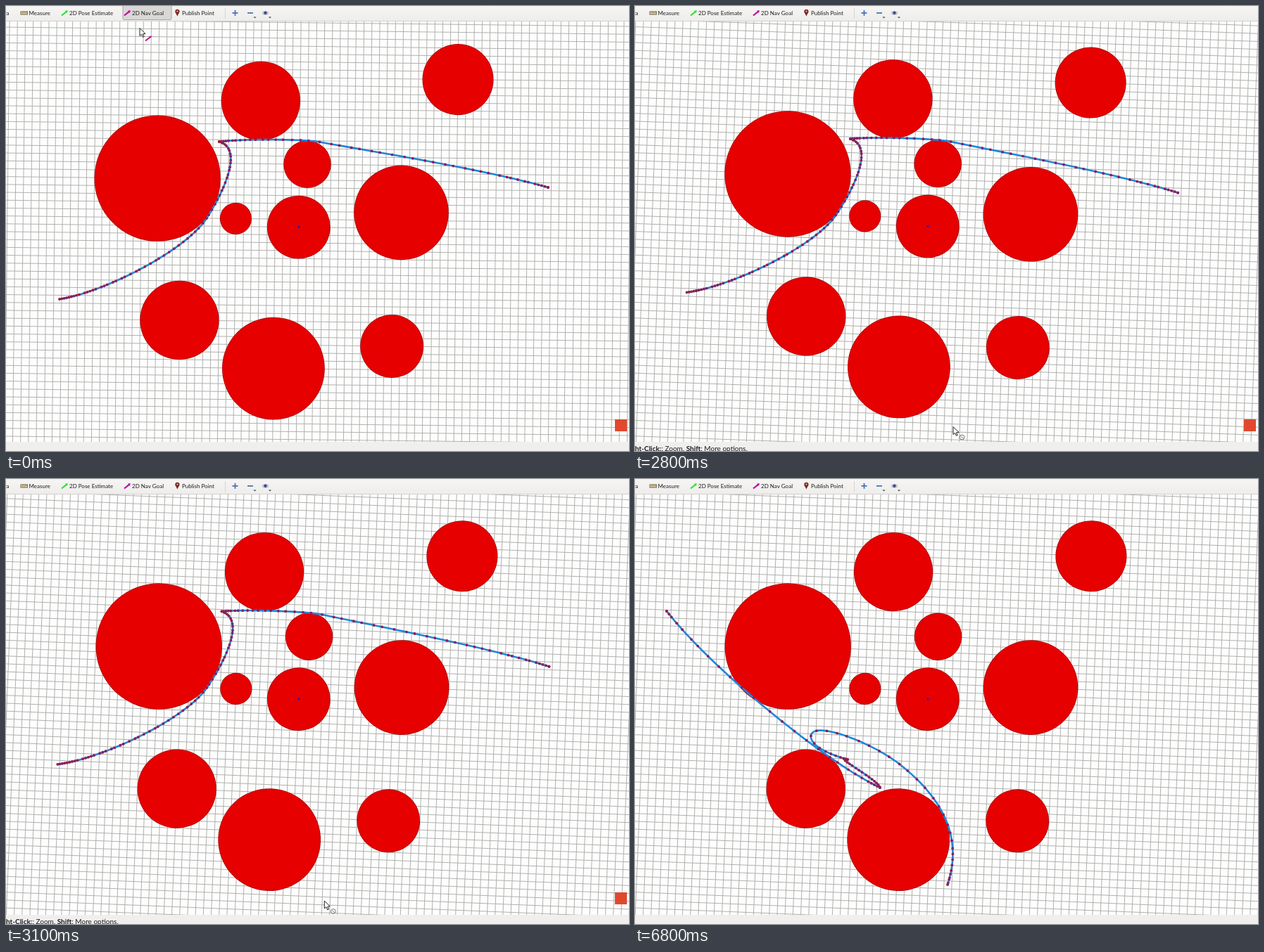
Write an HTML page with a canvas that moves like this. It is 885 by 633 pixels and loops after 6.9 s.

```html
<!DOCTYPE html>
<html lang="en">
<head>
<meta charset="utf-8">
<title>Path planner view</title>
<style>
html, body { margin: 0; width: 100%; height: 100%; overflow: hidden; background: #f1f0ef; }
canvas { display: block; }
</style>
</head>
<body>
<canvas id="view" width="885" height="633"></canvas>
<script>
const ctx = document.getElementById('view').getContext('2d');
const LOOP = 6900, STEP = 100;
const CELL = 11.19, CX = 415.8, CY = 314.6;
const YAW = 0.0115, YAW_PER_PX = 0.0124, DRAG_X = 450, LIFT = 50;
const FONT = 'Lato, "Open Sans", sans-serif';

// Obstacles in grid cells: x, y, radius
const discs = [[-18, -6, 8], [-5, -16, 5], [20, -19, 4.5], [1, -8, 3], [-8, -1, 2],
  [0, 0, 4], [13, -2, 6], [-15, 12, 5], [-3, 18, 6.5], [12, 15, 4]];

// Pointer moves: start time, end x, end y, steps (three if left out)
const moves = [[200, 121, 346], [600, 86, 462], [1000, 39, 215], [1400, 41, 201, 1],
  [1500, 46, 254], [1800, 63, 278, 2], [2100, 415, 600], [2500, 450, 596],
  [2800, 454, 601, 2], [3000, 452.3, 600, 2], [3200, 450, 568, 1], [3400, 190, 9],
  [3900, 424, 384, 2], [4200, 437, 569], [4600, 453, 587, 4], [6300, 12, 4, 1]];

// Joined cubic curves as a polyline, with poses spread by speeding up and braking
function leg(accel, top, ...p) {
  const line = [p[0]], dots = [];
  for (let i = 0; i + 3 < p.length; i += 3) {
    for (let k = 1; k <= 60; k++) {
      const u = k / 60, v = 1 - u;
      line.push([0, 1].map(j => v * v * v * p[i][j] + 3 * v * v * u * p[i + 1][j] +
        3 * v * u * u * p[i + 2][j] + u * u * u * p[i + 3][j]));
    }
  }
  const len = [0];
  for (let i = 1; i < line.length; i++) {
    len.push(len[i - 1] + Math.hypot(line[i][0] - line[i - 1][0], line[i][1] - line[i - 1][1]));
  }
  const total = len[len.length - 1];
  for (let s = 0, i = 0; s < total;) {
    while (len[i] < s) i++;
    dots.push(line[i]);
    s += Math.min(top, Math.sqrt(5 + 2 * accel * Math.min(s, total - s)));
  }
  dots.push(line[line.length - 1]);
  return { line, dots };
}

const firstPath = [
  leg(0.25, 8, [76, 417], [140, 407], [255, 348], [285, 302], [305, 271], [340, 204], [303, 193]),
  leg(0.7, 15, [303, 193], [330, 189.5], [402, 188.8], [440, 192.5], [550, 212], [680, 233], [770, 258])];
const secondPath = [
  leg(1, 17, [444, 577], [460, 528], [455, 470], [380, 409], [338, 374], [246, 340], [250, 368],
    [253, 382], [280, 393], [302, 399]),
  leg(0.5, 6, [302, 399], [278, 392], [346, 428], [348, 439]),
  leg(2, 24, [348, 439], [270, 402], [110, 271], [45, 188])];

function stroke(color, width, ...pts) {
  ctx.strokeStyle = color;
  ctx.lineWidth = width;
  ctx.beginPath();
  pts.forEach(p => ctx.lineTo(...p));
  ctx.stroke();
}

function poly(color, ...pts) {
  ctx.fillStyle = color;
  ctx.beginPath();
  pts.forEach(p => ctx.lineTo(...p));
  ctx.closePath();
  ctx.fill();
}

function rect(color, x, y, w, h) {
  ctx.fillStyle = color;
  ctx.fillRect(x, y, w, h);
}

function dot(color, x, y, r) {
  ctx.fillStyle = color;
  ctx.beginPath();
  ctx.arc(x, y, r, 0, 7);
  ctx.fill();
}

function text(str, x, y, size, weight = 400) {
  ctx.font = `${weight} ${size}px ${FONT}`;
  ctx.fillStyle = '#1c1c1c';
  ctx.fillText(str, x, y);
  return x + ctx.measureText(str).width;
}

function arrow(color, x, y, angle, size, half) {
  const head = size * 0.72;
  ctx.save();
  ctx.translate(x, y);
  ctx.rotate(angle);
  poly(color, [0, -half], [head, -half], [head, -2 * half], [size, 0],
    [head, 2 * half], [head, half], [0, half]);
  ctx.restore();
}

function pointerAt(t) {
  let x = 190, y = 31.5;
  for (const [start, ex, ey, steps = 3] of moves) {
    if (t < start) break;
    const k = Math.min(1, ((t - start) / STEP + 1) / steps);
    x += (ex - x) * k;
    y += (ey - y) * k;
  }
  return [x, y];
}

// The view turns with the pointer while it is dragged
function turnAt(t) {
  const held = Math.max(2700, Math.min(3100, t));
  return YAW_PER_PX * (pointerAt(held)[0] - DRAG_X);
}

function drawPath(legs) {
  for (const { line } of legs) stroke('#1e86dc', 2.6, ...line);
  for (const { dots } of legs) {
    for (const [x, y] of dots) {
      dot('#a81434', x, y, 1.9);
      dot('#4a3aa8', x + 0.5, y + 0.3, 1);
    }
  }
}

function drawScene(t) {
  const turn = turnAt(t), replanned = t >= 5400;
  ctx.save();
  ctx.beginPath();
  ctx.rect(0, 22, 885, 598);
  ctx.clip();
  rect('#fdfdfd', 0, 22, 885, 598);
  ctx.translate(CX, CY - LIFT * turn);
  ctx.rotate(YAW + turn);
  const edge = 50 * CELL;
  for (let c = -edge; c < edge + 1; c += CELL) {
    stroke('#aaaaa7', 0.9, [c, -edge], [c, edge]);
    stroke('#aaaaa7', 0.9, [-edge, c], [edge, c]);
  }
  for (const [x, y, r] of discs) {
    dot('#a80808', x * CELL, y * CELL, r * CELL + 0.2);
    dot('#e60000', x * CELL, y * CELL, r * CELL - 0.6);
  }
  dot('#2018c8', 0, 0, 1.6);

  // Paths are given in screen space at the turn they were planned in
  const base = replanned ? turn : 0;
  ctx.rotate(-YAW - base);
  ctx.translate(-CX, LIFT * base - CY);
  drawPath(replanned ? secondPath : firstPath);
  ctx.restore();
}

function drawToolbar(active) {
  const bar = ctx.createLinearGradient(0, 0, 0, 22);
  bar.addColorStop(0, '#f6f5f4');
  bar.addColorStop(1, '#eeedec');
  rect(bar, 0, 0, 885, 22);
  rect('#d4d2d0', 0, 21, 885, 1);
  if (active) {
    ctx.beginPath();
    ctx.roundRect(166, -2, 69, 21.5, 2);
    ctx.fillStyle = '#dad8d6';
    ctx.fill();
    ctx.strokeStyle = '#aaa8a6';
    ctx.lineWidth = 1;
    ctx.stroke();
  }
  ctx.textAlign = 'right';
  text('ra', 4.5, 13, 8);
  ctx.textAlign = 'left';
  text('Measure', 32.5, 13, 8);
  text('2D Pose Estimate', 90, 13, 8);
  text('2D Nav Goal', 179, 13, 8);
  text('Publish Point', 250, 13, 8);

  rect('#6e6248', 20.5, 7.5, 10.5, 5);
  rect('#d8c898', 21.3, 8.3, 9, 3.2);
  for (let x = 23; x < 30; x += 2) rect('#6e6248', x, 8, 0.7, 1.8);
  arrow('#35e035', 79, 13.5, -0.68, 11.5, 1.1);
  arrow('#c00aa0', 168, 13.5, -0.68, 11.5, 1.1);

  poly('#7c2a20', [240.4, 8.5], [246.4, 8.5], [243.4, 14.5]);
  dot('#7c2a20', 243.4, 7.8, 3.1);
  dot('#e8c0b4', 243.4, 7.6, 1.1);

  rect('#d6d4d2', 311, 3, 1, 15);
  rect('#4a76b6', 321.5, 9, 8, 1.8);
  rect('#4a76b6', 324.6, 5.9, 1.8, 8);
  rect('#4a76b6', 343, 9, 8, 1.8);
  ctx.beginPath();
  ctx.ellipse(368.5, 10, 4.8, 3, 0, 0, 7);
  ctx.fillStyle = '#c4cad6';
  ctx.fill();
  dot('#3c4c88', 368.5, 9.7, 2.2);
  for (const x of [353.5, 375]) poly('#444', [x - 2, 15.5], [x + 2, 15.5], [x, 17.5]);
}

function drawStatus(shown) {
  rect('#f0efee', 0, 620, 885, 13);
  if (!shown) return;
  let x = text('ht-Click:', 0, 633, 10, 700);
  x = text(': Zoom, ', x, 633, 10);
  x = text('Shift', x, 633, 10, 700);
  text(': More options.', x, 633, 10);
}

function drawPointer(x, y, goal) {
  if (y > 22 && goal) arrow('#c00a90', x + 8, y + 18, -0.66, 11.5, 0.9);
  else if (y > 22) {
    ctx.strokeStyle = '#777';
    ctx.lineWidth = 1;
    ctx.beginPath();
    ctx.arc(x + 12.5, y + 15, 3.4, 0, 7);
    ctx.stroke();
    stroke('#777', 0.9, [x + 10.5, y + 13.5], [x + 14.5, y + 16.5]);
  }
  const shape = [[0, 0], [0, 11], [2.6, 8.8], [4.4, 12.8], [6.2, 12], [4.5, 8.2], [8, 8]]
    .map(p => [x + p[0], y + p[1]]);
  poly('#fff', ...shape);
  stroke('#222', 1, ...shape, shape[0]);
}

function draw(time) {
  const t = Math.floor((time % LOOP) / STEP) * STEP;
  const during = (from, to) => t >= from && t < to;
  const goal = during(0, 1900) || during(3600, 5100);
  drawScene(t);
  drawToolbar(goal);
  drawStatus(during(1900, 3500) || during(5300, 6600));
  if (t < 6800) rect('#e0492e', 865, 588, 17, 17);
  if (during(1500, 1900)) arrow('#a414ac', 41, 201, 1.46, 28, 1.2);
  if (during(4700, 5100)) arrow('#a414ac', 444, 577, 1.24, 26.5, 1.2);
  if (t < 6600) drawPointer(...pointerAt(t), goal);
}

function tick() {
  draw(performance.now());
  requestAnimationFrame(tick);
}
tick();
</script>
</body>
</html>
```
